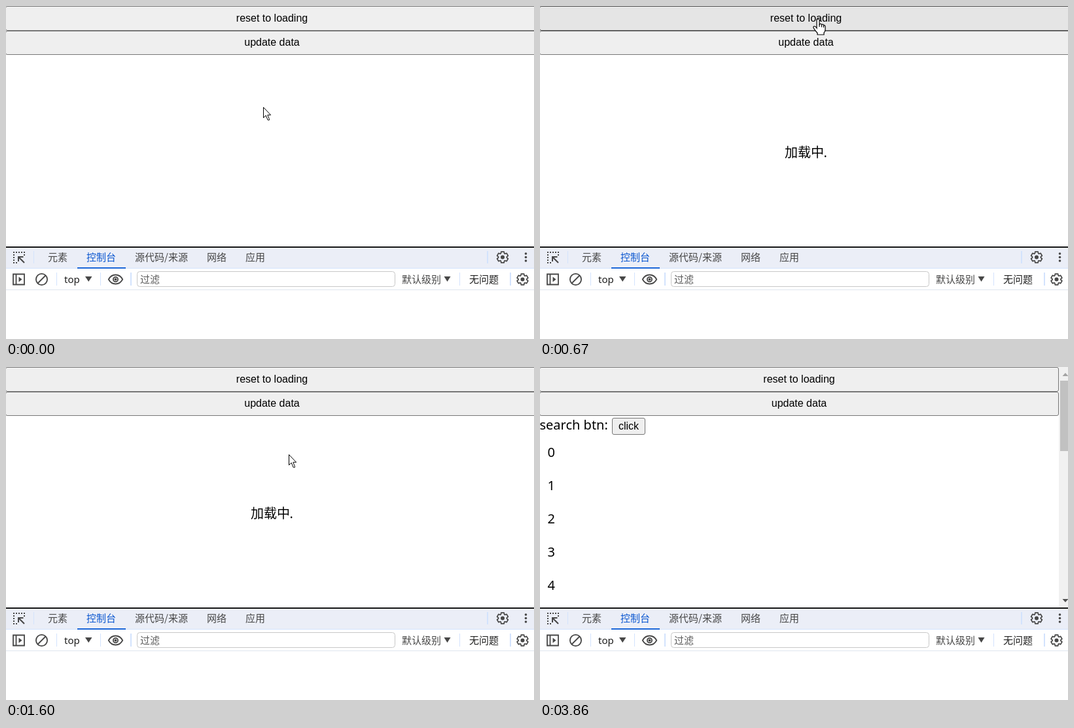
Animation of 807x511 px, one loop 4330 ms. Source, as an HTML page with a canvas:

```html
<!DOCTYPE html>
<html lang="zh-CN">
<head>
<meta charset="utf-8">
<title>Loading demo</title>
<style>
html, body { margin: 0; width: 100%; height: 100%; overflow: hidden; background: #fff; }
canvas { display: block; }
</style>
</head>
<body>
<canvas id="stage" width="807" height="511"></canvas>
<script>
const ctx = document.getElementById('stage').getContext('2d');
const LOOP = 4330;
const LOAD_AT = 610, DATA_AT = 3130, LEAVE_AT = 3860, DOT_MS = 330;
const ARIAL = '16px "Liberation Sans", Arial, sans-serif';
const LATIN = '20px "Noto Sans", "Open Sans", sans-serif';
const CJK = '"Noto Sans CJK SC", "Noto Sans CJK", sans-serif';
const ICON = '#474747', RULE = '#d3e3fd';

// Pointer keys: time, x, y
const track = [
  [0, 393, 155], [45, 393, 155], [200, 398, 125], [320, 408, 75],
  [430, 414, 44], [520, 421, 28], [610, 425, 21], [790, 426, 19],
  [910, 426, 19], [1040, 427, 62], [1150, 430, 116], [1210, 432, 129],
  [1260, 432, 134], [3440, 432, 134], [3550, 468, 168], [3650, 565, 268],
  [3740, 682, 391], [3830, 768, 487]
];

const arrow = new Path2D('M.5 .5V16.5L4.2 13L7.2 20H9.4V18.5L6.8 12.2H11.6Z');
const hand = new Path2D('M-2 2Q-2 0 0 0Q2 0 2 2V8Q4 6.5 5.5 8.5Q8 7.5 8.5 9.5Q10.5 9 11 11.5V16Q11 19 9 21V24H-1V21.5Q-5 17 -7 13.5Q-7.5 11 -5.5 11Q-4 11 -2 14Z');
const knuckles = new Path2D('M2 8V12M5.5 8.5V12.5M8.5 9.5V13');

function rect(x, y, w, h, color) {
  ctx.fillStyle = color;
  ctx.fillRect(x, y, w, h);
}

function text(str, x, y, font, color = '#000', align = 'left') {
  ctx.font = font;
  ctx.fillStyle = color;
  ctx.textAlign = align;
  ctx.fillText(str, x, y);
}

function box(x, y, w, h, r, fill, stroke) {
  ctx.beginPath();
  ctx.roundRect(x, y, w, h, r);
  ctx.fillStyle = fill;
  ctx.fill();
  ctx.strokeStyle = stroke;
  ctx.lineWidth = 1;
  ctx.stroke();
}

function poly(points, color) {
  ctx.beginPath();
  points.forEach(([x, y]) => ctx.lineTo(x, y));
  ctx.closePath();
  ctx.fillStyle = color;
  ctx.fill();
}

function line(d, width = 1.8, color = ICON) {
  ctx.strokeStyle = color;
  ctx.lineWidth = width;
  ctx.stroke(new Path2D(d));
}

function disc(x, y, r, color = ICON) {
  ctx.beginPath();
  ctx.arc(x, y, r, 0, 7);
  ctx.fillStyle = color;
  ctx.fill();
}

function ring(x, y, r) {
  ctx.beginPath();
  ctx.arc(x, y, r, 0, 7);
  ctx.strokeStyle = ICON;
  ctx.lineWidth = 1.8;
  ctx.stroke();
}

function gear(x, y) {
  ctx.beginPath();
  for (let k = 0; k < 6; k++) {
    const mid = (k / 3 - 0.5) * Math.PI;
    for (const [da, r] of [[-0.42, 6.4], [-0.26, 8.7], [0.26, 8.7], [0.42, 6.4]]) {
      ctx.lineTo(x + r * Math.cos(mid + da), y + r * Math.sin(mid + da));
    }
  }
  ctx.closePath();
  ctx.strokeStyle = ICON;
  ctx.lineWidth = 1.7;
  ctx.lineJoin = 'round';
  ctx.stroke();
  ctx.lineJoin = 'miter';
  disc(x, y, 3);
}

function button(label, y, h, right, base, state) {
  const [fill, edge] = {
    idle: ['#efefef', '#767676'],
    hover: ['#e5e5e5', '#4f4f4f'],
    down: ['#f5f5f5', '#8d8d8d']
  }[state];
  box(-0.5, y + 0.5, right, h - 1, 2.5, fill, edge);
  text(label, (right - 1) / 2, base, ARIAL, '#000', 'center');
}

function loading(t) {
  const dots = t < 1600 ? 1 + Math.min(2, Math.floor((t - LOAD_AT + 10) / DOT_MS)) : 1;
  const step = 4.35;
  const x = 406.2 - (60 + step * dots) / 2;
  text('加载中', x, 232, '20px ' + CJK);
  for (let i = 0; i < dots; i++) text('.', x + 59.5 + i * step, 232, LATIN);
}

function list() {
  text('search btn:', -0.5, 96, LATIN);
  box(110.5, 78.5, 50, 25, 2.5, '#efefef', '#767676');
  text('click', 135.5, 96, ARIAL, '#000', 'center');
  for (let i = 0; i < 5; i++) text(String(i), 11.5, 138 + 51 * i, LATIN);

  rect(793, 0, 14, 369, '#f1f1f1');
  rect(795, 21, 12, 108, '#c1c1c1');
  poly([[798.5, 14], [803, 9], [807.5, 14]], '#a3a3a3');
  poly([[798.5, 356], [803, 361], [807.5, 356]], '#505050');
}

function tabs() {
  rect(0, 369, 807, 2, '#151515');
  rect(0, 371, 807, 31, '#ebeef7');
  rect(0, 402, 807, 1, RULE);
  rect(109, 401, 74, 2, '#1b66d8');

  const font = '15px ' + CJK;
  text('元素', 64, 391, font, ICON);
  text('控制台', 123, 391, font, '#0b57d0');
  text('源代码/来源', 197, 391, font, ICON);
  text('网络', 307, 391, font, ICON);
  text('应用', 366, 391, font, ICON);
  rect(42, 376, 1, 19, RULE);
  rect(735, 376, 2, 19, RULE);

  // Element picker
  for (let i = 0; i < 5; i++) {
    rect(11 + i * 4, 377, 2, 2, ICON);
    if (i) rect(11, 377 + i * 4, 2, 2, ICON);
  }
  rect(27, 381, 2, 2, ICON);
  rect(15, 393, 2, 2, ICON);
  line('M19 392V385H26.5M19.5 385.5L28 394', 2);

  gear(759, 385.5);
  for (const y of [380, 385.5, 391]) disc(794.5, y, 1.8);
}

function toolbar() {
  rect(0, 403, 807, 32, '#fff');
  rect(0, 435, 807, 1, '#dfe5ee');

  line('M11 411.5H28V427.5H11ZM15.5 411.5V427.5');
  poly([[19.5, 415.5], [24.5, 419.5], [19.5, 423.5]], ICON);
  ring(54.5, 419.5, 8.6);
  line('M48.5 425.5L60.5 413.5');

  line('M156.8 419.5Q160.5 412.5 167.5 412.5Q174.5 412.5 178.2 419.5Q174.5 426.5 167.5 426.5Q160.5 426.5 156.8 419.5Z');
  ring(167.5, 419.5, 3.6);
  disc(167.5, 419.5, 2);

  for (const x of [77, 144, 693]) rect(x, 409, 1, 20, RULE);
  for (const x of [190, 770]) rect(x, 409, 2, 20, RULE);

  const font = '15px ' + CJK;
  text('top', 89, 425, '15px "Noto Sans", "Open Sans", sans-serif', '#1f1f1f');
  poly([[121, 415], [131.5, 415], [126.2, 423]], ICON);
  box(200.5, 407.5, 394, 23, 4, '#fff', '#c7c7c7');
  text('过滤', 205, 425, font, '#5a5a5a');
  text('默认级别', 605, 425, font, ICON);
  poly([[669.5, 415], [679.5, 415], [674.5, 423]], ICON);
  text('无问题', 708, 425, font, '#1f1f1f');
  gear(789.5, 419.5);
}

function pointerAt(t) {
  const i = track.findIndex(key => key[0] > t);
  if (i < 0) return track[track.length - 1].slice(1);
  const [t0, x0, y0] = track[i - 1], [t1, x1, y1] = track[i];
  const p = (t - t0) / (t1 - t0);
  return [Math.round(x0 + (x1 - x0) * p), Math.round(y0 + (y1 - y0) * p)];
}

function pointer(x, y, onButton) {
  ctx.save();
  ctx.translate(x, y);
  ctx.fillStyle = '#fff';
  ctx.strokeStyle = '#000';
  ctx.lineWidth = onButton ? 1.2 : 1;
  ctx.fill(onButton ? hand : arrow);
  ctx.stroke(onButton ? hand : arrow);
  if (onButton) ctx.stroke(knuckles);
  ctx.restore();
}

function draw(t) {
  // The pointer is sampled every 30 ms
  const phase = t < 3470 ? 10 : 20;
  const tick = Math.max(0, Math.floor((t - phase) / 30) * 30 + phase);
  const [x, y] = pointerAt(tick);
  const loaded = t >= DATA_AT;
  const right = loaded ? 793 : 814;
  const onReset = y < 38, onUpdate = y >= 38 && y < 75;
  const pressed = t >= 550 && t < LOAD_AT;

  rect(0, 0, 807, 511, '#fff');
  button('reset to loading', 0, 38, right, 24, onReset ? (pressed ? 'down' : 'hover') : 'idle');
  button('update data', 38, 37, right, 61, onUpdate ? 'hover' : 'idle');
  if (loaded) list();
  else if (t >= LOAD_AT) loading(t);
  tabs();
  toolbar();
  if (t < LEAVE_AT) pointer(x, y, onReset || onUpdate);
}

const start = performance.now();
function frame() {
  draw((performance.now() - start) % LOOP);
  requestAnimationFrame(frame);
}
frame();
</script>
</body>
</html>
```
